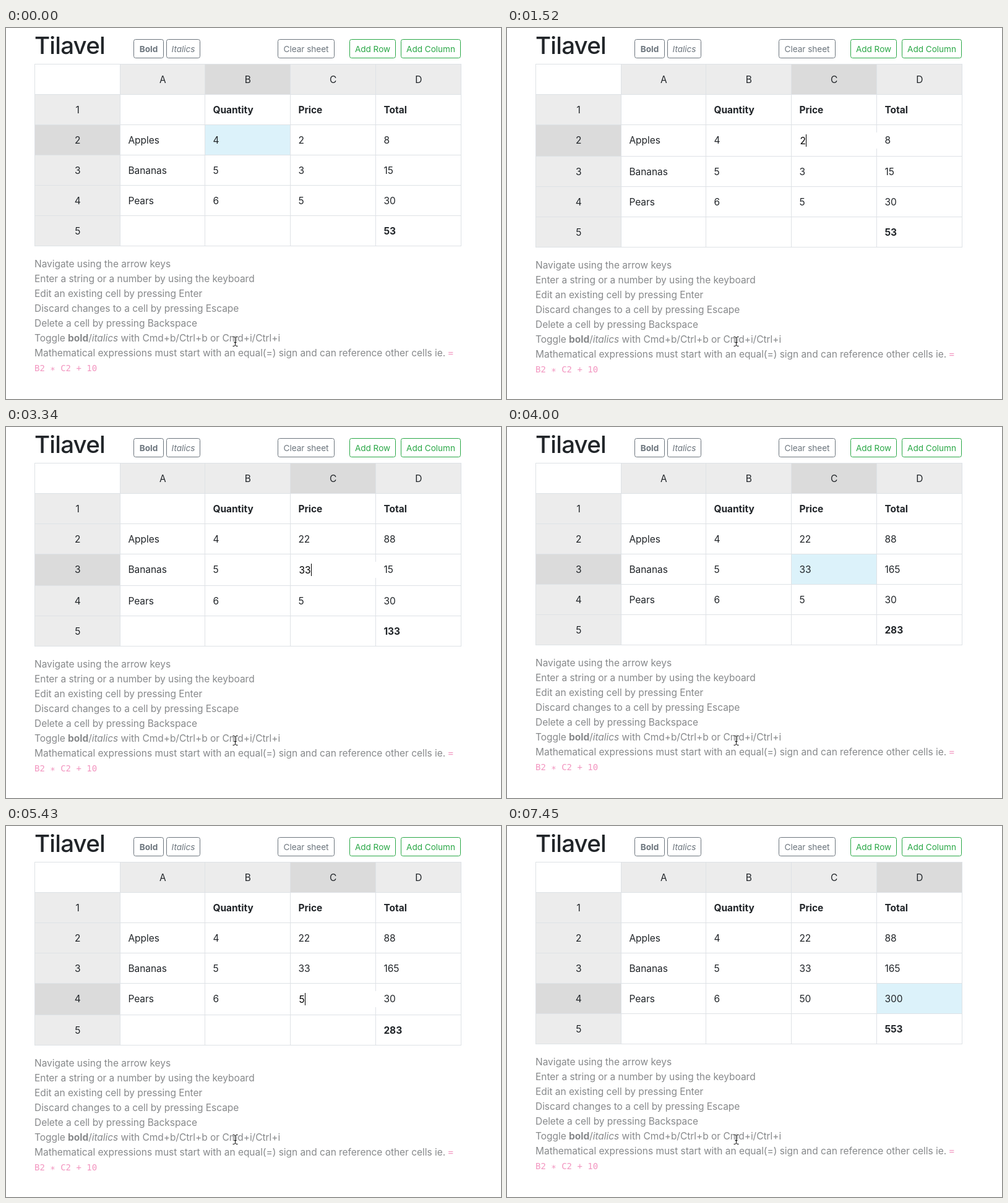
Animation, 800 px wide and 600 px high, one loop 8000 ms. Source, as an HTML page:

```html
<!DOCTYPE html>
<html lang="en">
<head>
<meta charset="utf-8">
<title>Tilavel</title>
<style>
html, body { margin: 0; width: 100%; height: 100%; overflow: hidden; background: #fff; }
svg { display: block; font: 15.5px Inter, "Open Sans", sans-serif; letter-spacing: -.035px; fill: #212529; }
text { white-space: pre; }
.mid { text-anchor: middle; }
.bold { font-weight: 700; }
.italic { font-style: italic; }
.button { font-size: 13.6px; }
.code { font: 14px "DejaVu Sans Mono", monospace; letter-spacing: 0; fill: #e83e8c; }
#title { font-size: 38.5px; font-weight: 500; letter-spacing: -.8px; }
#help { opacity: .54; }
#pointer path { fill: none; }
</style>
</head>
<body>
<svg width="800" height="600" viewBox="0 0 800 600">
  <text id="title" x="46" y="42">Tilavel</text>
  <g id="buttons"></g>
  <g id="sheet"></g>
  <g id="help"></g>
  <g id="pointer"></g>
</svg>
<script>
const LOOP = 8000, LEFT = 46, TOP = 58, ROW = 49;
const EDGES = [46, 184, 321, 459, 597, 735];

// time, selected column, selected row, text being edited, caret hidden
const STEPS = [
  [0, 2, 2], [410, 3, 2], [1520, 3, 2, '2'], [1580, 3, 2, '22'],
  [2210, 3, 2], [2710, 3, 3], [3220, 3, 3, '3'], [3340, 3, 3, '33'],
  [4000, 3, 3], [4680, 3, 4], [5430, 3, 4, '5'], [6030, 3, 4, '5', true],
  [6500, 3, 4, '5'], [6620, 3, 4, '50'], [7160, 3, 4, '50', true], [7450, 4, 4]
];
const ITEMS = [
  { name: 'Apples', count: 4, price: 2, newPrice: 22, at: 2210 },
  { name: 'Bananas', count: 5, price: 3, newPrice: 33, at: 4000 },
  { name: 'Pears', count: 6, price: 5, newPrice: 50, at: 7450 }
];
const HELP = [
  'Navigate using the arrow keys',
  'Enter a string or a number by using the keyboard',
  'Edit an existing cell by pressing Enter',
  'Discard changes to a cell by pressing Escape',
  'Delete a cell by pressing Backspace',
  'Toggle <tspan class="bold">bold</tspan>/<tspan class="italic">italics</tspan> with Cmd+b/Ctrl+b or Cmd+i/Ctrl+i',
  'Mathematical expressions must start with an equal(=) sign and can reference other cells ie. <tspan class="code">=</tspan>',
  '<tspan class="code">B2 <tspan dy="3">*</tspan><tspan dy="-3"> C2 + 10</tspan></tspan>'
];

const $ = id => document.getElementById(id);
const rect = (x, y, w, h, fill) => `<rect x="${x}" y="${y}" width="${w}" height="${h}" fill="${fill}"/>`;
const text = (x, y, s, cls = '', fill = '') =>
  `<text x="${x}" y="${y}" class="${cls}"${fill && ` fill="${fill}"`}>${s}</text>`;

function button(x, w, label, color, cls = '') {
  return `<rect x="${x + .5}" y="18.5" width="${w - 1}" height="30" rx="3" fill="none" stroke="${color}"/>` +
    text(x + w / 2, 39, label, 'button mid ' + cls, color);
}

function cellValues(t) {
  const rows = ITEMS.map(({ name, count, price, newPrice, at }) => {
    const p = t < at ? price : newPrice;
    return [name, count, p, count * p];
  });
  const sum = rows.reduce((total, row) => total + row[3], 0);
  return [['', 'Quantity', 'Price', 'Total'], ...rows, ['', '', '', sum]];
}

function drawSheet([t, selCol, selRow, edit, caretHidden]) {
  const values = cellValues(t);
  const rowTop = r => TOP + ROW * r + (edit && r > selRow ? 2 : 0);
  let fills = '', lines = '', labels = '';

  for (let r = 0; r < 6; r++) for (let c = 0; c < 5; c++) {
    const x = EDGES[c], y = rowTop(r), next = EDGES[c + 1];
    const header = !r || !c, base = y + 31;
    let fill = '#fff';
    if (header && r + c) fill = (r ? r === selRow : c === selCol) ? '#dbdbdb' : '#ececec';
    else if (!edit && r === selRow && c === selCol) fill = '#dcf2fa';
    fills += rect(x + 1, y + 1, next - x - 1, rowTop(r + 1) - y - 1, fill);

    if (header) labels += text((x + next + 1.5) / 2, base, r ? r : ' ABCD'[c], 'mid');
    else if (!edit || r !== selRow || c !== selCol)
      labels += text(x + 13.4, base, values[r - 1][c - 1], r === 1 || r === 5 ? 'bold' : '');
  }
  const bottom = rowTop(6);
  for (let r = 0; r < 7; r++) lines += rect(LEFT, rowTop(r), 690, 1, '#dee2e6');
  for (const x of EDGES) lines += rect(x, TOP, 1, bottom - TOP + 1, '#dee2e6');

  let input = '';
  if (edit) {
    const x = EDGES[selCol], y = rowTop(selRow);
    input = rect(x + 13, y + 13, 126, 26, '#fff') + text(x + 14.4, y + 32, edit, '', '#000');
    if (!caretHidden) input += rect(x + 14 + 10 * edit.length, y + 16, 1, 20, '#000');
  }
  $('sheet').innerHTML = fills + lines + input + labels;
  $('help').setAttribute('transform', `translate(0 ${edit ? 2 : 0})`);
}

const GREY = '#6c757d', GREEN = '#28a745';
$('buttons').innerHTML =
  button(206, 49, 'Bold', GREY, 'bold') + button(259, 55, 'Italics', GREY, 'italic') +
  button(439, 92, 'Clear sheet', GREY) +
  button(555, 75, 'Add Row', GREEN) + button(638, 97, 'Add Column', GREEN);
$('help').innerHTML = HELP.map((line, i) => text(LEFT, 387 + 24 * i, line)).join('');

const beam = 'M366.5 499.5h1.5q2 0 2.5 2q.5-2 2.5-2h1.5M370.5 501v11M368.5 508.5h4' +
  'M366.5 514.5h1.5q2 0 2.5-2q.5 2 2.5 2h1.5';
$('pointer').innerHTML = `<path d="${beam}" stroke="#fff" stroke-width="2.5"/><path d="${beam}" stroke="#000"/>`;

let shown;
const start = performance.now();
function tick() {
  const t = (performance.now() - start) % LOOP;
  const step = STEPS.findLast(s => s[0] <= t);
  if (step !== shown) drawSheet(shown = step);
  requestAnimationFrame(tick);
}
tick();
</script>
</body>
</html>
```
